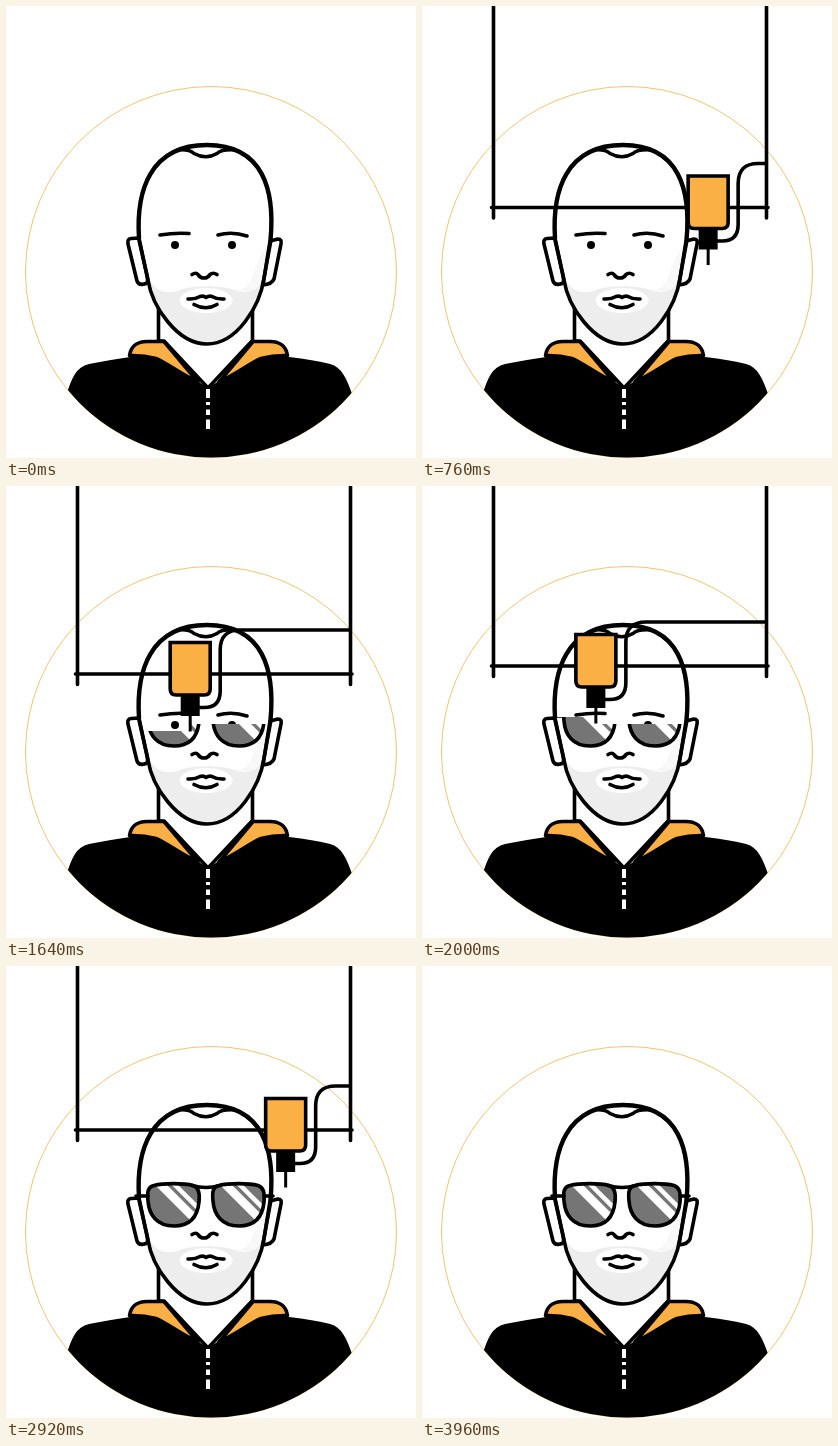
Animation of 410x452 px, one loop 4.56 s. Source, as an HTML page:

```html
<!DOCTYPE html>
<html lang="en">
<head>
<meta charset="utf-8">
<title>Printed sunglasses</title>
<style>
  html, body { margin: 0; width: 100%; height: 100%; overflow: hidden; background: #fff; }
  svg { display: block; width: 410px; height: 452px; }
  .line { fill: none; stroke: #000; stroke-width: 3.6; stroke-linecap: round; stroke-linejoin: round; }
  .crown { stroke-width: 4.4; }
  .mitred { stroke-linejoin: miter; }
  .white { fill: #fff; }
  .orange { fill: #fbb045; }
</style>
</head>
<body>
<svg viewBox="0 0 410 452">
  <defs>
    <clipPath id="disc"><circle cx="205" cy="266" r="185.5"/></clipPath>
    <clipPath id="printed"><path id="printedArea"/></clipPath>
    <path id="lensShape" d="M148 219.500C157 217 178 217 187 219.500C193 221.500 194 228 193 236C191.500 251 184 260 168 260C151 260 143 249 142 235C141 225 142 221 148 219.500Z"/>
    <clipPath id="lensClip"><use href="#lensShape"/></clipPath>
    <g id="lens">
      <use href="#lensShape" fill="#757575"/>
      <g clip-path="url(#lensClip)" stroke="#fff">
        <path d="M146 210L206 270" stroke-width="8.500"/>
        <path d="M160 210L210 260" stroke-width="4.500"/>
      </g>
      <use href="#lensShape" class="line"/>
    </g>
  </defs>

  <circle cx="205" cy="266" r="185.500" fill="none" stroke="#f3b344" stroke-width=".8"/>

  <!-- hoodie -->
  <g clip-path="url(#disc)">
    <path d="M61 387C66 372 70 361 83 358Q103 354 124 351L150 348L202 382L255 348L283 351Q308 354 324 358C336 361 341 373 347 391V452H61Z"/>
  </g>
  <path class="line white" d="M152.500 300V335H158L202 382L246 335H246.500V300"/>
  <path id="collar" class="line orange" d="M123.500 349.500C125 339 133 335.500 141 335.500H158L192 376C176 369 164 359 150 352.500Q137 349 123.500 349.500Z"/>
  <use href="#collar" transform="matrix(-1 0 0 1 405 0)"/>
  <path d="M202 383V392M202 396V399M202 403.500V409M202 413.500V423" stroke="#fff" stroke-width="4"/>

  <!-- head -->
  <path class="white" d="M133 232C130 185 144 139 201 139S270 185 265 234L258 274C254 300 231 338 201 338S146 300 142 274Z"/>
  <path fill="#f8f8f8" d="M228 284C249 284 246 262 260 240L258 272L246 300Z"/>
  <path fill="#ededed" d="M140 262C144 284 157 290 174 284C185 279 216 279 228 284C243 290 254 284 258 270L258 274C254 300 231 338 201 338S146 300 142 274Z"/>
  <ellipse class="white" cx="200" cy="294.500" rx="26.500" ry="12.500"/>
  <path class="line white" d="M133 232L125 232.500Q121 233 122 238L131 275Q133 280 140 277.500Q142 276 141.500 272Z"/>
  <path class="line white" d="M264 235L272 233Q276 233 275 238L268 273Q266 278 257 279Z"/>
  <path class="line" d="M133 234L142 274C146 300 171 338 201 338S254 300 258 272L265 234"/>
  <path class="line crown" d="M133 232C130 185 144 139 201 139S269 185 264.500 234"/>
  <path class="line" d="M172 144Q183 143 188 147.500Q200 154 211 147.500Q216 143 229 144"/>
  <path class="line" d="M154 229Q169 226.500 183 227.500M212 229Q226 225 241 230"/>
  <circle cx="169" cy="239" r="4"/>
  <circle cx="226" cy="239" r="4"/>
  <path class="line" d="M186 268.500Q190 266 192 268.500Q194 272 198 272Q202 272 204 268.500Q207 266 211 268.500"/>
  <path class="line" d="M182 293Q189 293.500 194 290.500Q198 289.500 200 291.500Q203 289.500 206 290.500Q211 293.500 218 293M188 298.500Q200 305 211 298.500"/>

  <g clip-path="url(#printed)">
    <use href="#lens"/>
    <use href="#lens" x="65"/>
    <path class="line" d="M186 219.500Q200 223.500 214 219.500M130 230H142M258 230H267"/>
  </g>

  <!-- printer: the group's origin is the rail height -->
  <g id="gantry">
    <path class="line" d="M71.500 -500V10.500M344.500 -500V10.500M69.500 0H346"/>
    <path id="tube" class="line"/>
    <g id="head">
      <path d="M0 40V57.500" stroke="#000" stroke-width="3"/>
      <rect x="-9.500" y="20" width="19" height="22"/>
      <path class="line orange mitred" d="M-20 -31.500H20V15Q20 21 14 21H-14Q-20 21 -20 15Z"/>
    </g>
  </g>
</svg>
<script>
const LOOP = 4560, STEP = 40;
const ENTER = 40, EXIT = 3360, TRAVEL = 600;
const PRINT_START = 688, ROW_TIME = 380, LAST_ROW_TIME = 428, LIFT_TIME = 60;
const RAIL = [201.5, 196, 188, 180, 172.5, 164];
const LAST = RAIL.length - 1;
const HIDDEN = -57.5, PARKED = 303, LEFT = 107, RIGHT = 264;

const $ = id => document.getElementById(id);
const clamp = p => Math.min(1, Math.max(0, p));
const mix = (a, b, p) => a + (b - a) * p;
const sine = p => (1 - Math.cos(Math.PI * clamp(p))) / 2;
const cubic = p => {
  p = clamp(p);
  return p < .5 ? 4 * p ** 3 : 1 - 4 * (1 - p) ** 3;
};
const rect = (x0, y0, x1, y1) => `M${x0} ${y0}H${x1}V${y1}H${x0}Z`;
const rowTop = row => row === LAST ? 212 : 252 - 7 * row;
const goesRight = row => row % 2 === 1;

function railAt(t, row, elapsed) {
  if (t < PRINT_START) return mix(HIDDEN, RAIL[0], cubic((t - ENTER) / TRAVEL));
  if (t >= EXIT) return mix(RAIL[LAST], HIDDEN, cubic((t - EXIT) / TRAVEL));
  return mix(RAIL[Math.max(0, row - 1)], RAIL[row], sine(elapsed / LIFT_TIME));
}

// The head sweeps once per row, leaving from and returning to its parking place.
function headAt(row, elapsed) {
  const right = row === 0 || row === LAST ? PARKED : RIGHT;
  const p = sine(elapsed / (row === LAST ? LAST_ROW_TIME : ROW_TIME));
  return goesRight(row) ? mix(LEFT, right, p) : mix(right, LEFT, p);
}

// Finished rows, plus the part of the current row the needle has passed.
function printedPath(row, x) {
  const base = row ? rowTop(row - 1) : 264;
  const [x0, x1] = goesRight(row) ? [100, x] : [x, PARKED];
  return rect(100, base, PARKED, 264) + rect(x0, rowTop(row), x1, base);
}

function draw(t) {
  const printTime = Math.max(0, t - PRINT_START);
  const row = Math.min(LAST, Math.floor(printTime / ROW_TIME));
  const elapsed = printTime - row * ROW_TIME;
  const x = headAt(row, elapsed);
  const pipe = x + 30;
  const bend = Math.min(20, 344 - pipe);

  $('gantry').setAttribute('transform', `translate(0 ${railAt(t, row, elapsed)})`);
  $('gantry').style.display = t < 80 || t >= EXIT + TRAVEL ? 'none' : '';
  $('head').setAttribute('transform', `translate(${x} 0)`);
  $('tube').setAttribute('d',
    `M${x + 9} 33.500H${x + 14}Q${pipe} 33.500 ${pipe} 17V${bend - 44}Q${pipe} -44 ${pipe + bend} -44H344`);
  $('printedArea').setAttribute('d', printedPath(row, x));
}

const start = performance.now();
function tick() {
  const t = (performance.now() - start) % LOOP;
  draw(Math.floor(t / STEP) * STEP);
  requestAnimationFrame(tick);
}
tick();
</script>
</body>
</html>
```
